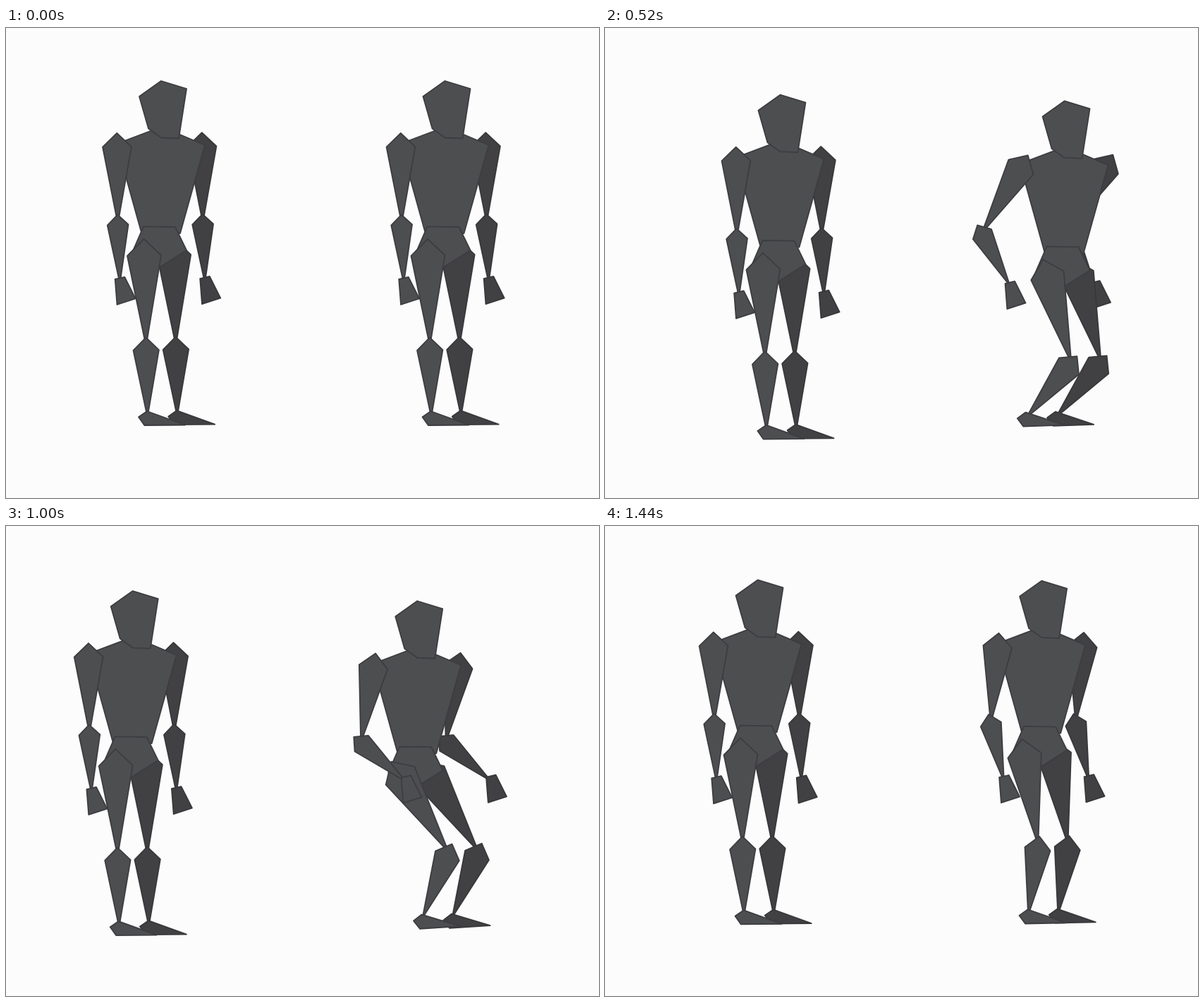
Write an HTML page with a canvas that moves like this. It is 841 by 666 pixels and loops after 1480 ms.

```html
<!DOCTYPE html>
<html lang="en">
<head>
<meta charset="utf-8">
<title>Crouching figures</title>
<style>
html, body { margin: 0; width: 100%; height: 100%; overflow: hidden; background: #fcfcfc; }
canvas { display: block; }
</style>
</head>
<body>
<canvas id="stage" width="841" height="666"></canvas>
<script>
const ctx = document.getElementById('stage').getContext('2d');
const STEP = 40, LOOP = 1480, MOVE = LOOP - STEP;
const NEAR = { fill: '#4d4e50', line: '#3d3d41' };
const FAR = { fill: '#414144', line: '#38383b' };

const head = [220,75, 256,86, 245,156.5, 220,155.5, 202,142.5, 189,97];
const torso = [157,164, 210,144, 235,146, 282,166, 247,291, 191.5,288];
const pelvis = [195,281.3, 240,282, 256,315, 218,339, 198,339, 179,318];

// Each bone is a kite: cap above its joint, waist below it, half width.
// slip: how far the end drifts per radian of turn; tilt: how much it turns along.
const leg = {
  joints: [[196, 323], [198.6, 451], [200.6, 551.5]],
  bones: [{ cap: 24, waist: -.5, half: 24 }, { cap: 12.5, waist: 5.5, half: 18.2 }],
  end: [188,551.3, 200,543, 254,562.5, 196.3,563],
  bend: 1, slip: 23, tilt: -.1
};
const arm = {
  joints: [[157.5, 170], [158.6, 277.5], [161.5, 362]],
  bones: [{ cap: 21, waist: -1.5, half: 20.4 }, { cap: 13, waist: 1.5, half: 14.9 }],
  end: [154.7,356, 168.3,352.8, 183.7,383.5, 157.5,392],
  bend: -1, slip: 19, tilt: 0
};

const dist = (a, b) => Math.hypot(b[0] - a[0], b[1] - a[1]);
const lean = (a, b) => Math.atan2(b[0] - a[0], b[1] - a[1]);
const shift = (p, d) => [p[0] + d[0], p[1] + d[1]];

function poly(pts, paint) {
  ctx.beginPath();
  for (let i = 0; i < pts.length; i += 2) ctx.lineTo(pts[i], pts[i + 1]);
  ctx.closePath();
  ctx.fillStyle = paint.fill;
  ctx.strokeStyle = paint.line;
  ctx.fill();
  ctx.stroke();
}

function at(pos, turn, drawPart) {
  ctx.save();
  ctx.translate(pos[0], pos[1]);
  ctx.rotate(turn);
  drawPart();
  ctx.restore();
}

function kite({ cap, waist, half }, length, paint) {
  poly([0, -cap, half, waist, 0, length, -half, waist], paint);
}

// Two-bone limb; its end holds its place but slips a little as the limb bends
function limb(kind, paint, offset, body, hold) {
  const [root, mid, end] = kind.joints;
  const l1 = dist(root, mid), l2 = dist(mid, end);
  const a = shift(root, body);
  let c = shift(end, hold), angle, turn = 0;
  for (let i = 0; i < 5; i++) {
    const slip = [-kind.slip * turn, .6 * kind.slip * turn * turn];
    c = shift(shift(end, hold), slip);
    const d = dist(a, c);
    const cos = (l1 * l1 + d * d - l2 * l2) / (2 * l1 * d);
    angle = lean(a, c) + kind.bend * Math.acos(Math.min(1, cos));
    turn = angle - lean(root, mid);
  }
  const b = [a[0] + l1 * Math.sin(angle), a[1] + l1 * Math.cos(angle)];
  const drop = .5 * kind.slip * turn * turn;
  at(offset, 0, () => {
    at(a, -angle, () => kite(kind.bones[0], l1, paint));
    at(b, -lean(b, c), () => kite(kind.bones[1], l2, paint));
    at([c[0], c[1] + drop], kind.tilt * turn, () => {
      ctx.translate(-end[0], -end[1]);
      poly(kind.end, paint);
    });
  });
}

function figure(x, body, hold) {
  at([x, 0], 0, () => {
    limb(arm, FAR, [120.5, -.8], body, hold);
    limb(leg, FAR, [42.2, -.9], body, hold);
    at(body, 0, () => [torso, pelvis, head].forEach(shape => poly(shape, NEAR)));
    limb(leg, NEAR, [0, 0], body, hold);
    limb(arm, NEAR, [0, 0], body, hold);
  });
}

// Steady sway to the right, across to the left, and back to the middle
function sway(t) {
  const right = 460, left = 965;
  if (t < right) return 31.3 * t / right;
  if (t < left) return 31.3 - 72.3 * (t - right) / (left - right);
  return -41 * (MOVE - t) / (MOVE - left);
}

// Steady way down, a stay, and a steady way up
const dip = (t, down, depth, up) => Math.min(down * t, depth, up * (MOVE - t));

function draw() {
  const tick = Math.floor(performance.now() % LOOP / STEP);
  const t = Math.max(0, tick - 1) * STEP;
  const x = sway(t), y = dip(t, .041, 22.3, .0355);
  const sink = dip(t, .0182, 14.2, .0305);
  ctx.fillStyle = '#fcfcfc';
  ctx.fillRect(0, 0, 841, 666);
  ctx.lineWidth = 1.8;
  ctx.lineJoin = 'round';
  figure(0, [x, y], [x, y]);
  figure(402.5, [x + .07 * sink, y + sink], [0, 0]);
  requestAnimationFrame(draw);
}
draw();
</script>
</body>
</html>
```
